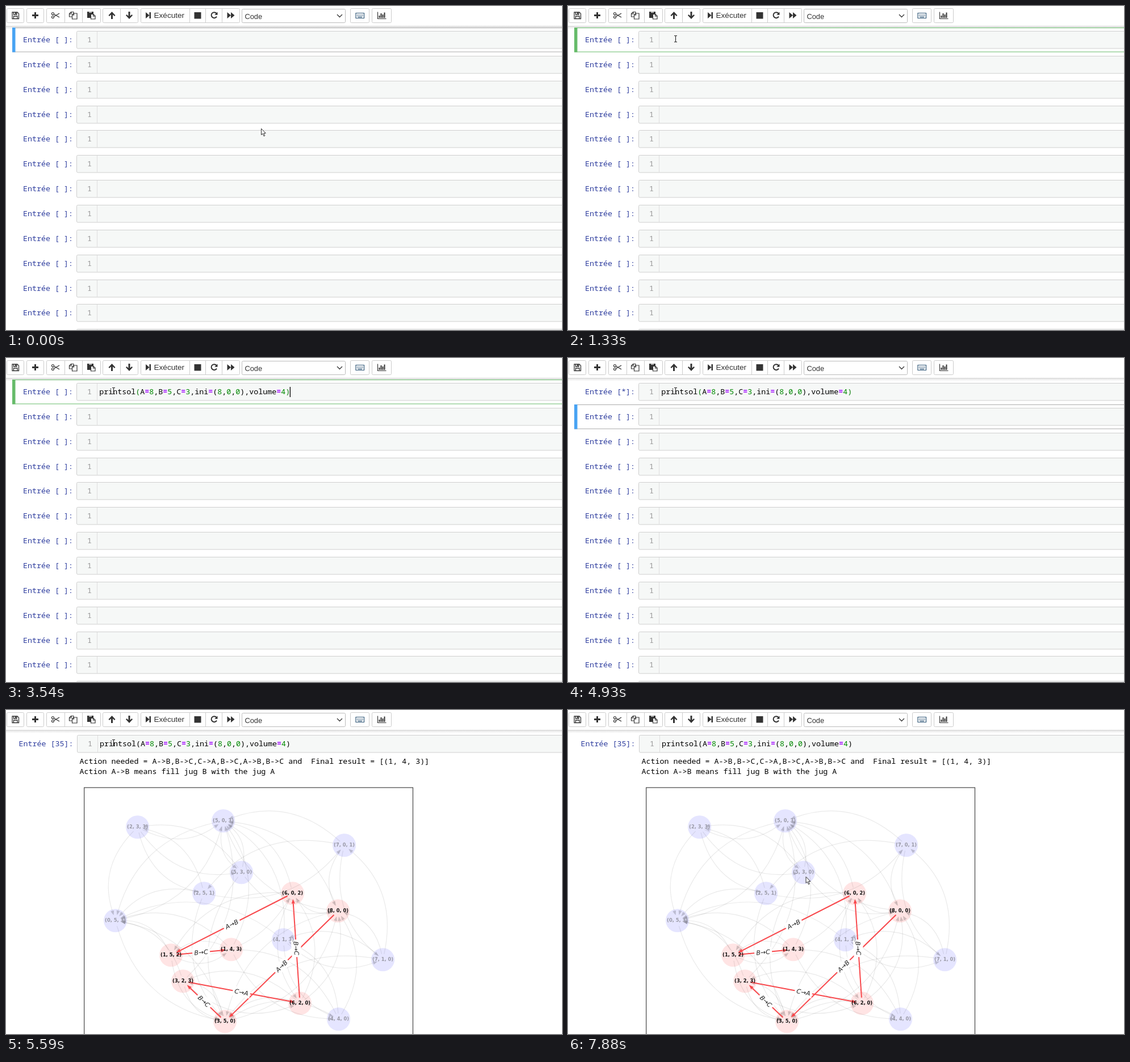
An HTML page that plays this animation: 979x572 px, repeating every 8 s.

```html
<!DOCTYPE html>
<html lang="fr">
<head>
<meta charset="utf-8">
<title>Notebook</title>
<style>
  html, body { margin: 0; width: 979px; height: 572px; overflow: hidden; background: #fff; }
  svg { display: block; }
  text { white-space: pre; }
  .mono { font: 13.33px "Noto Sans Mono", "DejaVu Sans Mono", monospace; }
  .prompt { fill: #303f9f; }
  .line { fill: #999; }
  .num { fill: #080; }
  .op { fill: #a2f; font-weight: bold; }
  .ui { font-family: "Liberation Sans", Arial, sans-serif; fill: #333; }
  .node { font: bold 8.3px "DejaVu Sans", sans-serif; text-anchor: middle; }
  .action { font: italic 11px "DejaVu Sans", sans-serif; text-anchor: middle; fill: #222; }
</style>
</head>
<body>
<svg id="stage" width="979" height="572" viewBox="0 0 979 572"></svg>
<script>
const LOOP = 8000, PITCH = 43.85;
const RUN = 4930, PRINTED = 5130, PLOTTED = 5590;
const rowTop = i => Math.round(44 + PITCH * i);

const mono = (x, y, s, cls = '') => `<text class="mono ${cls}" x="${x}" y="${y}">${s}</text>`;
const path = (d, attrs = 'fill="#333"') => `<path d="${d}" ${attrs}/>`;
const stroke = (w, color = '#333') => `fill="none" stroke="${color}" stroke-width="${w}"`;

// Toolbar
function button(x1, x2, dividers = []) {
  return `<rect x="${x1 + .5}" y="4.5" width="${x2 - x1 - 1}" height="25" rx="2" fill="#fff" stroke="#ccc"/>` +
    dividers.map(x => path(`M${x + .5} 5V29`, stroke(1, '#ccc'))).join('');
}

function toolbar() {
  const icons = [
    path('M11 11H20L22.500 13.500V22.500H11Z M13.500 11V15H19V11 M13.500 22V18H20V22', stroke(1.3)) +
      '<rect x="16" y="11" width="2" height="3" fill="#333"/>',
    path('M50 11H53V15H57V18H53V22H50V18H46V15H50Z'),
    path('M84.500 14.500L94 20 M84.500 18.500L94 13', stroke(1.4)) +
      '<g fill="none" stroke="#333" stroke-width="1.2"><circle cx="82.500" cy="13.500" r="2"/><circle cx="82.500" cy="19.500" r="2"/></g>',
    path('M116 19H111.500V13.500L114.500 10.500H119V13 M115 11V14H112 M116.500 15.500L119 13H125V23H116.500Z M119.500 13V16H117', stroke(1.2)),
    path('M143 10H154V14H149V21H143Z') + path('M149.500 14.500H154L157 17.500V23H149.500Z M153.500 15V18H157', stroke(1.2)) +
      '<rect x="146" y="10.500" width="5" height="1.200" fill="#fff"/>',
    path('M186.500 10L192.500 16.500L191 18L188 15.300V23H185V15.300L182 18L180.500 16.500Z'),
    path('M217 23L223 16.500L221.500 15L218.500 17.700V10H215.500V17.700L212.500 15L211 16.500Z'),
    path('M246 11L252.500 16.500L246 22Z M252.500 11H255V22H252.500Z'),
    path('M331.500 11H343.500V22.500H331.500Z'),
    path('M370.500 13A5 5 0 1 0 371 18.500', stroke(2)) + path('M372.500 10.500V15.800H367.200Z'),
    path('M389.500 11L396 16.500L389.500 22Z M396 11L402.500 16.500L396 22Z'),
    path('M616 12.500H630.500V21.500H616Z', stroke(1.2, '#345a7a')) +
      path('M618 15.500H629 M618 17.500H629', 'stroke="#345a7a" stroke-width="1.2" stroke-dasharray="1.3 .8"') +
      path('M619.500 19.600H627', stroke(1.2, '#345a7a')),
    path('M654.500 10.500V22.500H669.500', stroke(1.2)) +
      path('M656.500 17H658.500V21H656.500Z M659.500 13H661.500V21H659.500Z M662.500 15H664.500V21H662.500Z M665.500 11.500H667.500V21H665.500Z')
  ].join('');
  return `<rect width="979" height="36" fill="#fff"/><rect y="35" width="979" height="6" fill="url(#shade)"/>` +
    button(1, 32) + button(36, 67) + button(71, 167, [103, 134]) + button(170, 233, [201]) +
    button(237, 412, [323, 351, 380]) + button(606, 640) + button(644, 679) +
    '<rect x="415.500" y="5.500" width="182" height="24" rx="2" fill="#fff" stroke="#bbb"/>' +
    path('M583 15L587.500 19.500L592 15', stroke(1.3)) + icons +
    '<text class="ui" x="260.500" y="21.300" font-size="13.600">Exécuter</text>' +
    '<text class="ui" x="420.500" y="23" font-size="12.800">Code</text>';
}

// Notebook cells
function cell(y, x = 124) {
  return `<rect x="${x + .5}" y="${y + .5}" width="900" height="30.500" rx="2" fill="#f6f8f7" stroke="#cfcfcf"/>` +
    path(`M${x + 36.5} ${y + 1}V${y + 31}`, stroke(1, '#dedede')) +
    mono(x + 19, y + 20.3, '1', 'line');
}

const row = i => cell(rowTop(i)) + mono(30, rowTop(i) + 20.3, 'Entrée [ ]:', 'prompt');

const code = 'printsol(A=8,B=5,C=3,ini=(8,0,0),volume=4)'
  .replace(/\d|=/g, c => `<tspan class="${c === '=' ? 'op' : 'num'}">${c}</tspan>`)
  .replace('(', '<tspan class="bracket">(</tspan>')
  .replace(/\)$/, '<tspan class="bracket">)</tspan>');

// Graph of the jug states
const LIMITS = [8, 5, 3];
const PLACES = {
  '2,3,3': [231, 206], '5,0,3': [382, 195], '7,0,1': [595, 238], '5,3,0': [414, 286],
  '2,5,1': [348, 323], '0,5,3': [192, 371], '4,1,3': [488, 405], '7,1,0': [663, 440],
  '4,4,0': [585, 545], '6,0,2': [504, 323], '8,0,0': [584, 354], '1,5,2': [290, 432],
  '1,4,3': [396, 422], '3,2,3': [311, 478], '3,5,0': [385, 549], '6,2,0': [517, 517]
};
const SOLUTION = ['8,0,0', '3,5,0', '3,2,3', '6,2,0', '6,0,2', '1,5,2', '1,4,3'];
const ACTIONS = ['A→B', 'B→C', 'C→A', 'B→C', 'A→B', 'B→C'];

function pours(state) {
  const jugs = state.split(',').map(Number), found = new Set();
  for (let from = 0; from < 3; from++) for (let to = 0; to < 3; to++) {
    const amount = Math.min(jugs[from], LIMITS[to] - jugs[to]);
    if (from === to || !amount) continue;
    const next = [...jugs];
    next[from] -= amount;
    next[to] += amount;
    found.add(next.join());
  }
  return [...found];
}

// Point at distance d from a, heading for b
function toward(a, b, d) {
  const dx = b[0] - a[0], dy = b[1] - a[1], len = Math.hypot(dx, dy);
  return [a[0] + dx / len * d, a[1] + dy / len * d];
}

function arrow(a, b, bend, color, width, lineAlpha, headAlpha) {
  const dx = b[0] - a[0], dy = b[1] - a[1];
  const mid = [(a[0] + b[0]) / 2 - bend * dy, (a[1] + b[1]) / 2 + bend * dx];
  const start = toward(a, mid, 10), tip = toward(b, mid, 10), base = toward(b, mid, 18);
  const wx = (base[1] - tip[1]) * .38, wy = (tip[0] - base[0]) * .38;
  return path(`M${start}Q${mid} ${base}`, `${stroke(width, color)} opacity="${lineAlpha}"`) +
    path(`M${tip}L${base[0] + wx},${base[1] + wy}L${base[0] - wx},${base[1] - wy}Z`,
      `fill="${color}" opacity="${headAlpha}"`);
}

function graph() {
  const states = Object.keys(PLACES), onPath = s => SOLUTION.includes(s);
  const nodes = states.map(s =>
    `<circle cx="${PLACES[s][0]}" cy="${PLACES[s][1]}" r="20.500" fill="${onPath(s) ? '#ffe4e4' : '#e5e5ff'}"/>`);
  const arcs = states.flatMap(s => pours(s).map(n =>
    arrow(PLACES[s], PLACES[n], .3, '#000', 1.2, .085, .18)));
  const names = states.map(s =>
    `<text class="node" x="${PLACES[s][0]}" y="${PLACES[s][1] + 2.5}" fill="${onPath(s) ? '#111' : '#9a9aa6'}">(${s.replace(/,/g, ', ')})</text>`);
  const steps = [], tags = [];
  ACTIONS.forEach((action, i) => {
    const a = PLACES[SOLUTION[i]], b = PLACES[SOLUTION[i + 1]];
    const angle = Math.atan((b[1] - a[1]) / (b[0] - a[0])) * 180 / Math.PI;
    steps.push(arrow(a, b, 0, '#f8484c', 2, 1, 1));
    tags.push(`<g transform="translate(${(a[0] + b[0]) / 2} ${(a[1] + b[1]) / 2}) rotate(${angle})">` +
      `<rect x="-15.500" y="-8.500" width="31" height="17" fill="#fff"/><text class="action" y="4">${action}</text></g>`);
  });
  return `<rect x="137.700" y="137" width="578.800" height="500" fill="#fff" stroke="#444" stroke-width="1.200"/>` +
    `<g transform="translate(.6 .7)">${[nodes, arcs, steps, tags, names].flat().join('')}</g>`;
}

const stage = document.getElementById('stage');
stage.innerHTML = `
  <defs><linearGradient id="shade" x2="0" y2="1">
    <stop stop-color="#d6d6d6"/><stop offset=".4" stop-color="#ececec"/><stop offset="1" stop-color="#fff"/>
  </linearGradient></defs>
  ${toolbar()}
  <g id="marker"><rect id="frame" x="11.500" y="38.500" width="1000" height="42.500" fill="none"/>
    <rect id="bar" x="11" y="38" width="5.500" height="43.500"/></g>
  <g id="first">${cell(44)}</g>
  ${mono(30, 64.3, '', 'prompt').replace('<text', '<text id="prompt"')}
  <g id="rows">${Array.from({ length: 12 }, (_, i) => row(i + 1)).join('')}</g>
  <g id="code">${mono(164.3, 64.3, code)}</g>
  <rect id="caret" y="51" width="1.300" height="18"/>
  <g id="output">${mono(129.5, 95.3, 'Action needed = A-&gt;B,B-&gt;C,C-&gt;A,B-&gt;C,A-&gt;B,B-&gt;C and  Final result = [(1, 4, 3)]')}
    ${mono(129.5, 112.5, 'Action A-&gt;B means fill jug B with the jug A')}</g>
  <g id="graph">${graph()}</g>
  <g id="arrow">${path('M.5 .5V11.500L3 9.200L5 13.800L6.800 13L4.900 8.600H8.300Z', 'fill="#fff" stroke="#333" stroke-width="1"')}</g>
  <g id="beam">${path('M-2.500 -5.500H-.7L0 -5L.7 -5.500H2.500 M0 -5V5 M-2.500 5.500H-.7L0 5L.7 5.500H2.500', stroke(1.1, '#222'))}</g>`;

const el = id => document.getElementById(id);
const show = (id, on) => el(id).setAttribute('display', on ? 'inline' : 'none');
const move = (id, x, y) => el(id).setAttribute('transform', `translate(${x} ${y})`);

// Pointer positions advance in 70 ms ticks
function glide(t, start, ticks, from, to, ease) {
  const k = Math.max(0, Math.min(ticks, Math.floor((t - start) / 70) + 1));
  const p = ease(k / ticks);
  return from.map((v, i) => v + (to[i] - v) * p);
}
const easeOut = p => 1 - (1 - p) ** 2;
const easeBoth = p => p * p * (3 - 2 * p);

function pointer(t) {
  if (t < 70) return [449, 216];
  if (t < 6910) return glide(t, 260, 7, [290, 141], [189.5, 58], easeOut);
  if (t < 7810) return glide(t, 6910, 12, [189.5, 58], [413, 282], easeBoth);
  return t < 7880 ? [421, 274] : [418.5, 294];
}

function caretOn(t) {
  const within = (a, b) => t >= a && t < b;
  return within(800, 1330) || within(1860, 2390) || within(2460, 2990) ||
    within(3540, 4000) || within(4530, RUN);
}

function draw(t) {
  const ran = t >= RUN, printed = t >= PRINTED, plotted = t >= PLOTTED;
  const typed = t >= 2460, editing = t >= 800 && !ran;

  show('marker', !plotted);
  move('marker', 0, printed ? 92 : ran ? 44 : 0);
  el('bar').setAttribute('fill', editing ? '#66bb6a' : '#48a3f3');
  el('frame').setAttribute('stroke', editing ? '#66bb6a' : '#ababab');

  show('rows', !plotted);
  move('rows', 0, printed ? 48 : 0);
  move('first', plotted ? 1 : 0, 0);
  move('code', plotted ? .8 : 0, 0);
  el('prompt').setAttribute('x', plotted ? 22.5 : 30);
  el('prompt').textContent = `Entrée [${plotted ? 35 : ran ? '*' : ' '}]:`;

  show('code', typed);
  document.querySelectorAll('.bracket').forEach(b => b.setAttribute('fill', plotted ? '#000' : '#0a7d0a'));
  show('caret', caretOn(t));
  el('caret').setAttribute('x', typed ? 499.7 : 164.5);
  show('output', printed);
  show('graph', plotted);

  const [x, y] = pointer(t);
  const overText = plotted ? y < 118 : (y - 44) % PITCH < 31;
  show('beam', overText);
  show('arrow', !overText);
  move('beam', x, y);
  move('arrow', x, y);
}

const begin = performance.now();
function tick() {
  draw((performance.now() - begin) % LOOP);
  requestAnimationFrame(tick);
}
tick();
</script>
</body>
</html>
```
